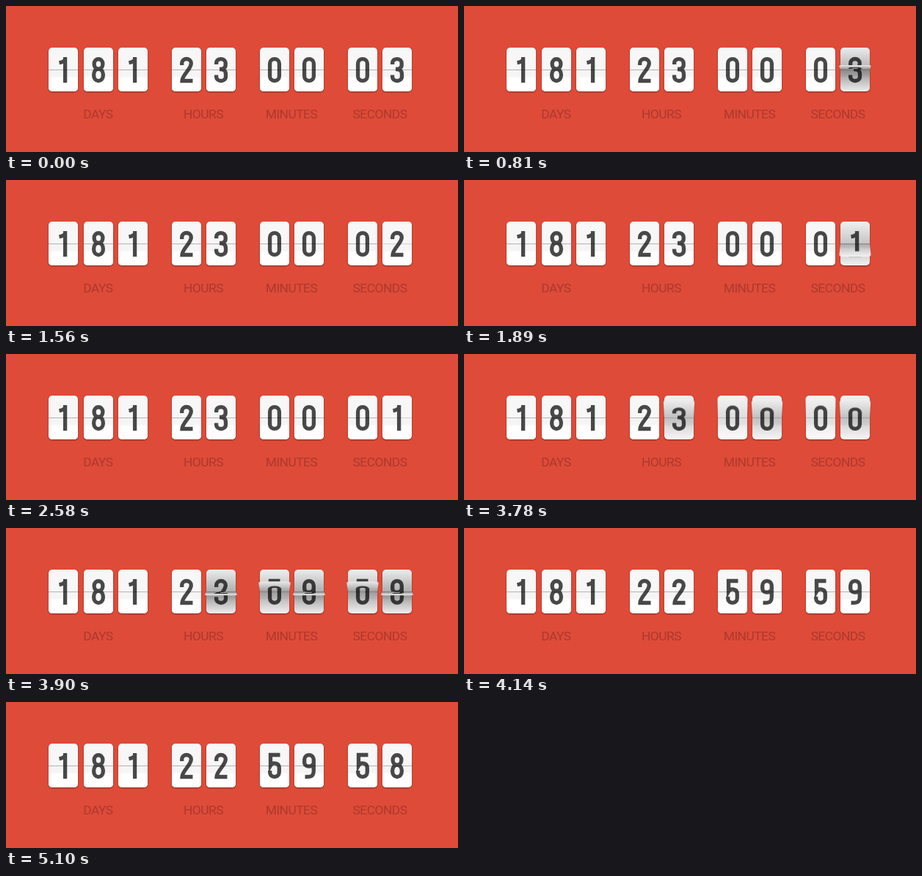
Write an HTML page that moves like this. It is 616 by 200 pixels and loops after 5.43 s.

```html
<!DOCTYPE html>
<html lang="en">
<head>
<meta charset="utf-8">
<title>Countdown</title>
<style>
html, body { margin: 0; width: 100%; height: 100%; overflow: hidden; background: #de4b39; }
#labels { position: absolute; left: 0; top: 0; fill: #ae392c; text-anchor: middle; font-stretch: 50%; letter-spacing: -.03em; }
.card { position: absolute; top: 57px; width: 40px; height: 60px; border-radius: 5px; box-shadow: 0 1px 2px rgba(0,0,0,.45); }
.half { position: absolute; left: 0; width: 40px; height: 30px; overflow: hidden; }
.half svg { position: absolute; left: 0; fill: none; stroke: #484848; stroke-width: 5.3; }
.half::after { content: ""; position: absolute; inset: 0; opacity: var(--shade, 0); }
.top { top: 0; border-radius: 5px 5px 0 0; background: #f7f7f7; transform-origin: 50% 100%; }
.top svg { top: 0; }
.top::after { background: linear-gradient(rgba(0,0,0,.08), rgba(0,0,0,.5)); }
.bottom { top: 30px; border-radius: 0 0 5px 5px; background: linear-gradient(#f5f5f5 30%, #fff 40%); transform-origin: 50% 0; }
.bottom svg { top: -30px; }
.bottom::before { content: ""; position: absolute; z-index: 1; width: 100%; height: 1px; background: rgba(0,0,0,.15); }
.bottom::after { background: linear-gradient(rgba(0,0,0,.5), rgba(0,0,0,.08)); }
</style>
</head>
<body>
<svg id="labels" width="616" height="200"></svg>
<script>
const LOOP = 5430, STEP = 30, FLIP = 480, TURN = 290, TENS_DELAY = 60;
const STARTS = [540, 1560, 2580, 3600, 4620];
const VALUES = ['181230003', '181230002', '181230001', '181230000', '181225959', '181225958'];
const CARD_X = [58, 106, 153, 226, 273, 346, 393, 466, 513];
const LABELS = { DAYS: 125.5, HOURS: 269, MINUTES: 389, SECONDS: 509.5 };

// Condensed numerals, drawn as centre lines around (0, 0)
const DIGITS = {
  0: 'M-6.4-8.5C-6.4-17 6.4-17 6.4-8.5V8.5C6.4 17-6.4 17-6.4 8.5Z',
  1: 'M2.6-17.5V17.5M2.5-14C1-11.5-1-10.5-5.5-9.8',
  2: 'M-6.3-6.5V-9C-6.3-17 6.3-17 6.3-9C6.3-1-6 7-6 15H8.5',
  3: 'M-6.3-7.5V-9.5C-6.3-16.8 6.2-16.8 6.2-9V-7C6.2-2.5 3-1-2-1C3-1 6.5.5 6.5 6V9C6.5 17-6.4 17-6.4 9V7',
  5: 'M7.5-15H-5.5V-.5C-3-5 6.3-5 6.3 3V8.5C6.3 17-6.3 17-6.3 9V6.5',
  8: 'M-5.9-8C-5.9-17 5.9-17 5.9-8C5.9 1-5.9 1-5.9-8ZM-6.4 7C-6.4-4 6.4-4 6.4 7C6.4 17.7-6.4 17.7-6.4 7Z',
  9: 'M6.3-3.5C4 2-6.3 2.5-6.3-5V-8.5C-6.3-17 6.3-17 6.3-8.5V6C6.3 14.5 3 15-5.5 15'
};

function addLabels() {
  const svg = document.getElementById('labels');
  const texts = Object.entries(LABELS).map(([word, x]) => {
    const text = document.createElementNS(svg.namespaceURI, 'text');
    text.textContent = word;
    text.setAttribute('x', x);
    svg.append(text);
    return text;
  });
  // Use the narrowest condensed face available
  const widthOf = family => {
    svg.style.font = `100px "${family}", sans-serif`;
    svg.style.fontStretch = '50%';
    return texts[3].getComputedTextLength();
  };
  const faces = ['Noto Sans', 'Open Sans', 'Roboto', 'Liberation Sans Narrow']
    .map(family => ({ family, width: widthOf(family) }))
    .sort((a, b) => a.width - b.width);
  const size = Math.min(23.5, 7400 / faces[0].width);
  svg.style.fontFamily = `"${faces[0].family}", sans-serif`;
  svg.style.fontSize = size + 'px';
  texts.forEach(text => text.setAttribute('y', 147.3 + size * .357));
}

function makeHalf(card, side) {
  const el = document.createElement('div');
  el.className = 'half ' + side;
  el.innerHTML = '<svg width="40" height="60" viewBox="-20 -30.5 40 60"><path/></svg>';
  card.append(el);
  const path = el.querySelector('path');
  return (digit, shade = 0, angle = 0, visible = true) => {
    path.setAttribute('d', DIGITS[digit]);
    el.style.setProperty('--shade', shade);
    el.style.transform = angle ? `perspective(300px) rotateX(${angle}deg)` : 'none';
    el.style.visibility = visible ? 'visible' : 'hidden';
  };
}

function makeCard(x) {
  const card = document.createElement('div');
  card.className = 'card';
  card.style.left = x + 'px';
  document.body.append(card);
  const [top, bottom, front, back] = ['top', 'bottom', 'top', 'bottom'].map(side => makeHalf(card, side));
  return (from, to, ms) => {
    const fall = Math.min(1, Math.max(0, (ms - STEP) / (TURN - STEP))) ** 1.5;
    const land = 1 - (1 - Math.min(1, Math.max(0, (ms - TURN) / (FLIP - TURN)))) ** 2;
    const shade = fall * (1 - land);
    top(to, shade * .65);
    bottom(land < 1 ? from : to, shade);
    front(from, fall, -90 * fall, fall < 1);
    back(to, shade, 90 * (1 - land), fall === 1);
  };
}

addLabels();
const cards = CARD_X.map(makeCard);

function draw(now) {
  const t = Math.floor(now % LOOP / STEP) * STEP;
  const n = STARTS.filter(start => start <= t).length;
  const to = VALUES[n], from = VALUES[Math.max(0, n - 1)];
  cards.forEach((show, i) => {
    const delay = i === 5 || i === 7 ? TENS_DELAY : 0;
    const ms = from[i] === to[i] ? FLIP : t - STARTS[n - 1] - delay;
    show(from[i], to[i], ms);
  });
}

const begin = performance.now();
function tick() {
  draw(performance.now() - begin);
  requestAnimationFrame(tick);
}
tick();
</script>
</body>
</html>
```
